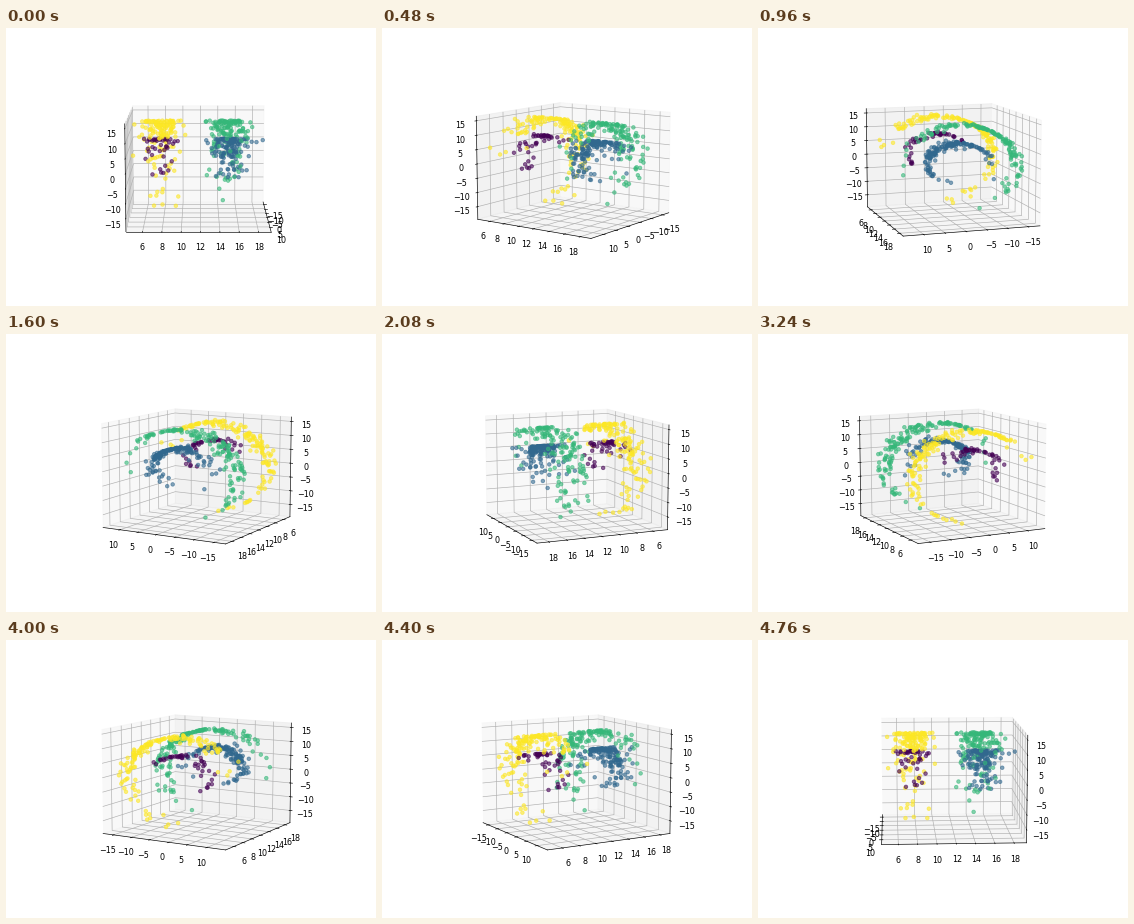
Recreate the animation shown at these times as a matplotlib script. Size 370 px wide and 278 px high, loop 4800 ms.

```python
import numpy as np
import matplotlib.pyplot as plt
from matplotlib.animation import FuncAnimation

FRAMES = 120
STEP = 360 / FRAMES
ELEV = 10
DPI = 57.8125

rng = np.random.default_rng(11)


def blob(count, t_mean, y_mean):
    """Gaussian cluster in the unrolled plane: roll angle t, height y."""
    return rng.normal((t_mean, y_mean), (0.9, 1.0), (count, 2))


INNER, OUTER = 7.5, 14.8
LOW, HIGH = 7.7, 15.1
clusters = [
    blob(45, INNER, LOW),
    blob(150, INNER, HIGH),
    blob(150, OUTER, HIGH),
    blob(150, OUTER, LOW),
]
t, y = np.vstack(clusters).T
labels = np.repeat(range(4), [len(c) for c in clusters])

fig = plt.figure(figsize=(6.4, 4.809), dpi=DPI)
ax = fig.add_subplot(projection="3d")
# Roll the plane into a spiral
ax.scatter(t * np.cos(t), y, t * np.sin(t), c=labels, cmap="viridis",
           s=20, alpha=0.6, depthshade=False)

ax.set_xlim(-17.95, 14.75)
ax.set_ylim(4.28, 19.3)
ax.set_zlim(-19.47, 16.57)
ax.set_xticks(range(-15, 11, 5))
ax.set_yticks(range(6, 19, 2))
ax.set_zticks(range(-15, 16, 5))


def update(frame):
    ax.view_init(elev=ELEV, azim=frame * STEP)
    return []


anim = FuncAnimation(fig, update, frames=FRAMES, interval=40,
                     repeat=True, repeat_delay=0, blit=False)
plt.show()
```
